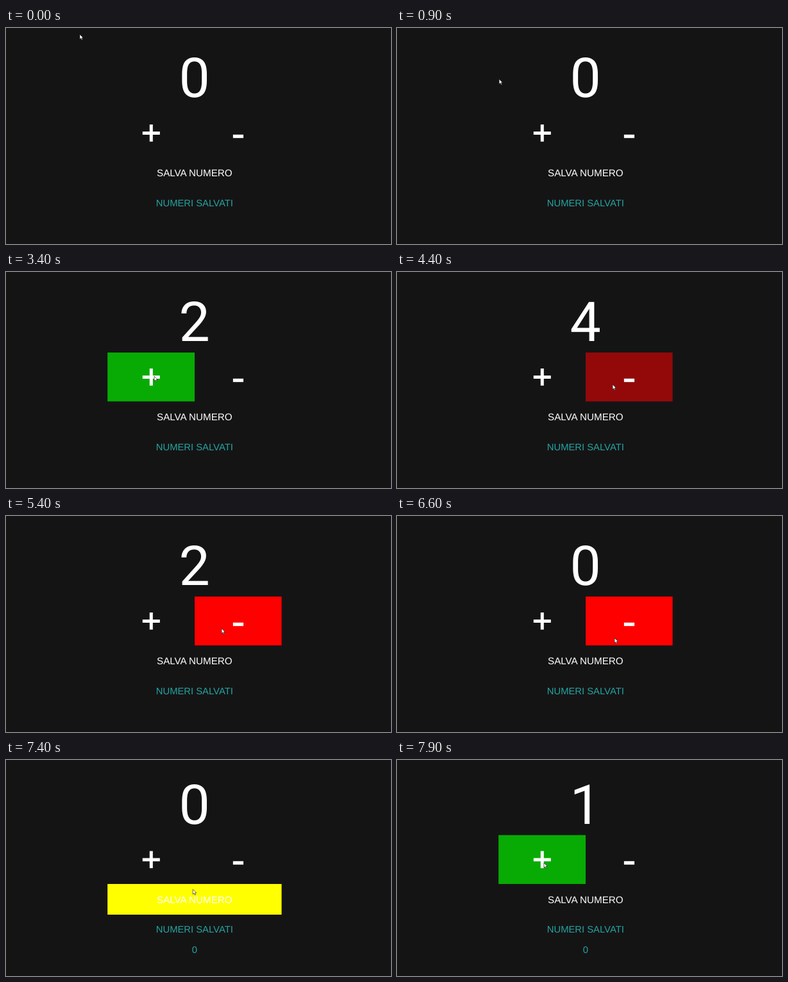
An HTML page that plays this animation: 600 px wide and 338 px high, repeating every 8 s.

```html
<!DOCTYPE html>
<html lang="it">
<head>
<meta charset="utf-8">
<style>
  html, body { margin: 0; width: 100%; height: 100%; overflow: hidden; background: #151415; }
  svg { display: block; width: 100vw; height: 100vh; }
  text {
    font: 15.2px "Liberation Sans", Arial, sans-serif;
    text-anchor: middle; text-rendering: geometricPrecision; fill: #fff;
  }
  #count { font: 86px Roboto, sans-serif; }
  .saved { font-size: 14.8px; fill: #22a5a0; }
</style>
</head>
<body>
<svg viewBox="0 0 600 338">
  <rect width="600" height="338" fill="#151415"/>
  <g id="app">
    <rect id="plus" x="158.2" y="126" width="135.8" height="76.5" fill="#08ab04"/>
    <rect id="minus" x="294" y="126" width="135.5" height="76.5" fill="#f00"/>
    <rect id="save" x="158.2" y="202.5" width="271.3" height="48" fill="#ff0"/>
    <text id="count" x="293.7" y="108.4">0</text>
    <path d="M212.8 164.4H239.8M226.3 151V177.8" stroke="#fff" stroke-width="5"/>
    <path d="M353.8 169.5H370" stroke="#fff" stroke-width="5.4"/>
    <text x="293.8" y="232">SALVA NUMERO</text>
    <text class="saved" x="293.8" y="278.9">NUMERI SALVATI</text>
    <text class="saved" id="item" x="293.8" y="310.8">0</text>
  </g>
  <path id="cursor" d="M0 0V7.6L1.8 6L3 8.8L4.3 8.2L3.1 5.5H5.5Z" fill="#fff" stroke="#111" stroke-width=".6"/>
</svg>
<script>
const DURATION = 8000, STEP = 100, FADE = 300, SAVE_TIME = 7200;
const $ = id => document.getElementById(id);

// pointer moves: each one eases from the previous stop
const moves = [
  { from: 0, to: 400, x: 122, y: 20 },
  { from: 400, to: 1500, x: 208, y: 159 },
  { from: 1500, to: 2400, x: 231, y: 163 },
  { from: 4000, to: 4400, x: 336, y: 176 },
  { from: 6200, to: 6600, x: 339, y: 191 },
  { from: 6600, to: 7000, x: 325, y: 225 },
  { from: 7200, to: 7700, x: 229, y: 161 }
];
// evenly spaced clicks on the buttons
const bursts = [
  { start: 2200, every: 610, clicks: 4, delta: 1 },
  { start: 4800, every: 470, clicks: 4, delta: -1 },
  { start: 7800, every: 500, clicks: 1, delta: 1 }
];
const hovers = [
  { id: "plus", enter: 1000, leave: 4050 },
  { id: "minus", enter: 4300, leave: 6650 },
  { id: "save", enter: 6650, leave: 7400 },
  { id: "plus", enter: 7500, leave: DURATION }
];

const clamp = (v, max = 1) => Math.min(max, Math.max(0, v));
const smooth = v => v * v * (3 - 2 * v);
const fade = ms => 1 - (1 - clamp(ms / FADE)) ** 1.9;

function pointerAt(t) {
  let x = 115, y = 10;
  for (const m of moves) {
    const k = smooth(clamp((t - m.from) / (m.to - m.from)));
    x += (m.x - x) * k;
    y += (m.y - y) * k;
  }
  return [x, y];
}

const countAt = t => bursts.reduce((sum, b) =>
  sum + b.delta * clamp(Math.floor((t - b.start) / b.every) + 1, b.clicks), 0);

const hoverAt = (t, id) => hovers.filter(h => h.id === id)
  .reduce((sum, h) => sum + fade(t - h.enter) - fade(t - h.leave), 0);

function render(t) {
  const saved = t >= SAVE_TIME;
  for (const id of ["plus", "minus", "save"]) $(id).setAttribute("opacity", hoverAt(t, id));
  $("count").textContent = countAt(t);
  $("item").setAttribute("visibility", saved ? "visible" : "hidden");
  $("app").setAttribute("transform", `translate(0 ${saved ? -8.5 : 0})`);
  $("cursor").setAttribute("transform", `translate(${pointerAt(t)})`);
}

const start = performance.now();
function tick() {
  const t = (performance.now() - start) % DURATION;
  render(Math.floor(t / STEP) * STEP);
  requestAnimationFrame(tick);
}
tick();
</script>
</body>
</html>
```
